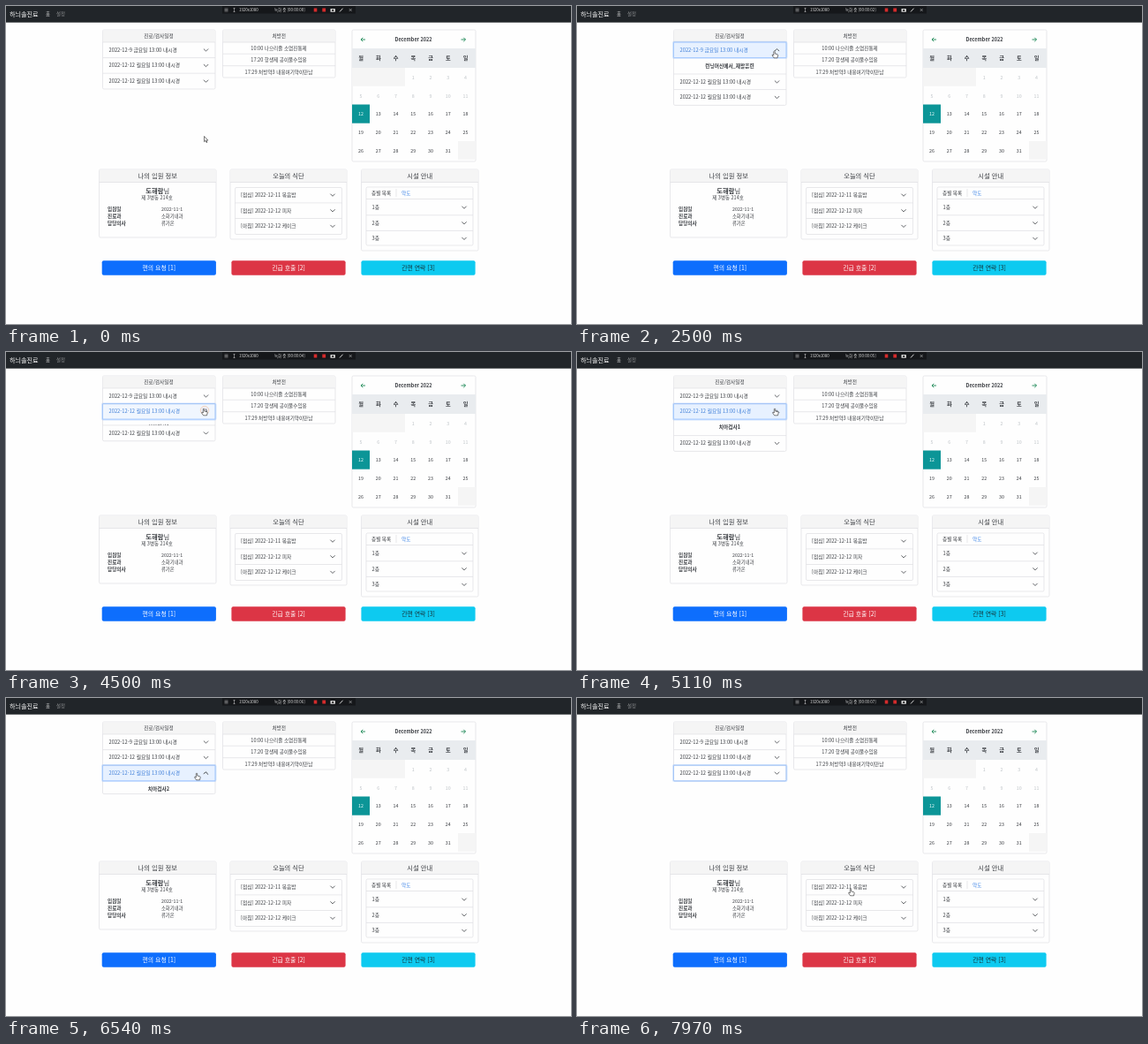
Write an HTML page that moves like this. It is 640 px wide and 360 px high and loops after 8000 ms.

```html
<!DOCTYPE html>
<html lang="ko">
<head>
<meta charset="utf-8">
<style>
  html, body { margin: 0; width: 100%; height: 100%; overflow: hidden; background: #fefefe; }
  svg { display: block; width: 100%; height: 100%; }
  text { font-family: "Noto Sans CJK KR", "Noto Sans CJK", "Noto Sans", sans-serif; white-space: pre; }
</style>
</head>
<body>
<svg id="stage" viewBox="0 0 640 360"></svg>
<script>
const LOOP = 8000;
const INK = '#3a3d42', LINE = '#dedee2', TINT = '#f5f5f5', PAPER = '#fefefe';
const stage = document.getElementById('stage');

// Static markup helpers
const rect = (x, y, w, h, fill, extra = '') =>
  `<rect x="${x}" y="${y}" width="${w}" height="${h}" fill="${fill}" ${extra}/>`;
const frame = (x, y, w, h, r = 1.5) => rect(x, y, w, h, PAPER, `rx="${r}" stroke="${LINE}" stroke-width=".7"`);
const path = (d, color, width = 0.8, extra = '') =>
  `<path d="${d}" fill="none" stroke="${color}" stroke-width="${width}" ${extra}/>`;
const rule = (x1, x2, y) => path(`M${x1} ${y}H${x2}`, LINE, 0.7);
function label(str, x, y, size = 5.7, { anchor = 'start', color = INK, weight = 400, id = '' } = {}) {
  return `<text ${id && `id="${id}"`} x="${x}" y="${y + size * 0.36}" font-size="${size}" fill="${color}"
    font-weight="${weight}" text-anchor="${anchor}">${str}</text>`;
}
const centered = (str, x, y, size, options = {}) => label(str, x, y, size, { ...options, anchor: 'middle' });
const chevron = (x, y) => path(`M${x - 2.6} ${y - 1.3}l2.6 2.6 2.6 -2.6`, INK, 0.8);

function card(title, x, y, w, h, head, size) {
  return frame(x, y, w, h) + rect(x + 0.3, y + 0.3, w - 0.6, head, TINT) +
    rule(x, x + w, y + head) + centered(title, x + w / 2, y + head / 2, size);
}

function navbar() {
  const grey = '#909294', pale = '#d8d8d8';
  return rect(0, 0, 640, 18.67, '#212529') +
    label('하늬솔진료', 4, 9, 7.1, { color: '#fff' }) +
    label('홈', 45, 9, 5.4, { color: pale }) + label('설정', 57, 9, 5.4, { color: grey }) +
    rect(245, 0, 151, 8.5, '#15171a') +
    path('M247.5 3h4M247.5 4.5h4M247.5 6h4M258.5 2v5M257.5 3l1 -1 1 1M257.5 6l1 1 1 -1', pale, 0.5) +
    label('1920x1080', 264, 4.4, 4.4, { color: pale }) +
    label('', 304, 4.4, 4.4, { color: pale, id: 'timer' }) +
    rect(348.7, 2.5, 3.6, 4, '#d52b2c') + rect(358.3, 2.5, 3.8, 4, '#d52b2c') +
    rect(367.5, 3, 5.4, 3.8, pale, 'rx=".6"') + '<circle cx="370.2" cy="4.9" r="1.1" fill="#222"/>' +
    path('M378 6.5l3.5 -3.8', pale, 1) + path('M388.7 3l3 3M391.7 3l-3 3', pale, 0.5);
}

function prescriptions() {
  const rows = ['10:00 나으리졸 소염진통제', '17:20 항생제 공이풀수입용', '17:29 처방약3 내용여기약이만남'];
  return card('처방전', 245.5, 27, 127.5, 54, 14, 5.7) +
    rows.map((row, i) => centered(row, 309, 47.5 + i * 13.5, 5.6) +
      (i ? rule(245.5, 373, 40.7 + i * 13.5) : '')).join('');
}

function calendar() {
  const left = 392, cell = 20, top = 70, rowH = 20.75;
  const column = i => left + 10 + i * 19.75;
  let out = frame(left, 27, 140, 149) + rect(left, 48, 140, 22, '#e9ecef') +
    rect(left, top, 60, rowH, TINT) + rect(512, top + rowH * 4, 20, rowH, TINT) +
    centered('December 2022', 461.5, 38, 5.5, { weight: 700 }) +
    path('M407 38h-5M404.2 35.8l-2.2 2.2 2.2 2.2M515.5 38h5M518.3 35.8l2.2 2.2 -2.2 2.2', '#198754', 0.9);
  [...'월화수목금토일'].forEach((day, i) => out += centered(day, column(i), 59, 6.2, { weight: 700 }));
  out += rect(left, 111.5, cell, 21.2, '#0c9597');
  for (let day = 1; day <= 31; day++) {
    const slot = day + 2;
    const color = day < 12 ? '#bfc4c8' : day === 12 ? '#f0ffff' : INK;
    out += centered(day, column(slot % 7), 81 + Math.floor(slot / 7) * rowH, 5.3, { color });
  }
  return out;
}

function patientInfo() {
  const rows = [['입원일', '2022-11-1'], ['진료과', '소화기내과'], ['담당의사', '류가온']];
  return card('나의 입원 정보', 105.5, 185, 132.5, 77, 14.5, 7.3) +
    centered('<tspan font-weight="700">도해람</tspan>님', 171.7, 209, 7.3) +
    centered('제 3병동 214호', 171, 217.5, 5.5) +
    rows.map(([key, value], i) => label(key, 115, 230 + i * 8, 5.6, { weight: 700 }) +
      label(value, 176, 230 + i * 8, 5.3)).join('');
}

function meals() {
  const rows = ['[점심] 2022-12-11 볶음밥', '[점심] 2022-12-12 피자', '[아침] 2022-12-12 케이크'];
  return card('오늘의 식단', 254, 185, 132, 79, 14.5, 7.3) + frame(259.5, 205.5, 121, 53) +
    rows.map((row, i) => label(row, 266, 214 + i * 17.6) + chevron(370, 214 + i * 17.6) +
      (i ? rule(259.5, 380.5, 205.3 + i * 17.6) : '')).join('');
}

function facilities() {
  return card('시설 안내', 402.5, 185, 132.5, 92, 14.5, 7.3) + frame(408, 205, 121, 66) +
    rule(408, 529, 218.5) + path('M442 207v9', LINE, 0.7) +
    label('층별 목록', 414, 211.5, 5.6) + label('약도', 448, 211.5, 5.6, { color: '#3f86e8' }) +
    [1, 2, 3].map((n, i) => label(n + '층', 414.5, 228 + i * 17.6) + chevron(519, 228 + i * 17.6) +
      (i ? rule(408, 529, 219.2 + i * 17.6) : '')).join('');
}

const button = (str, x, fill, color) => rect(x, 288.2, 129.2, 16.5, fill, 'rx="2"') +
  centered(str, x + 64.6, 296.5, 6.9, { color });

// Schedule accordion: press = mouse down, toggles start a little later
const ROW = 17.6, BODY = 18.4, LIST_TOP = 41;
const items = [
  { title: '2022-12-9 금요일 13:00 내시경', body: '런닝머신에서_재활훈련', press: 2000, open: 2140, close: 3400 },
  { title: '2022-12-12 월요일 13:00 내시경', body: '치아검사1', press: 4240, open: 4420, close: 5610 },
  { title: '2022-12-12 월요일 13:00 내시경', body: '치아검사2', press: 6140, open: 6370, close: 7400 },
];
const clicks = [[2000, 224, 51], [3270, 224, 51], [4240, 225, 66], [5470, 224, 66], [6140, 217, 86], [7270, 217, 86]];
const ticks = [1070, 2140, 3270, 4240, 5110, 6140, 7270];
const moves = [
  { from: 1330, to: 2000, x: 223.5, y: 51 },
  { from: 3540, to: 3840, x: 224, y: 64 },
  { from: 5540, to: 5900, x: 216, y: 85 },
  { from: 7460, to: 7960, x: 310, y: 216 },
];

const clamp = v => Math.max(0, Math.min(1, v));
const smooth = v => v * v * (3 - 2 * v);
const mix = (a, b, k) => a + (b - a) * k;

// CSS "ease": cubic-bezier(.25, .1, .25, 1)
function ease(x) {
  const curve = (a, b, u) => 3 * a * u * (1 - u) ** 2 + 3 * b * u * u * (1 - u) + u ** 3;
  let low = 0, high = 1;
  for (let i = 0; i < 18; i++) {
    const mid = (low + high) / 2;
    if (curve(0.25, 0.25, mid) < x) low = mid; else high = mid;
  }
  return curve(0.1, 1, low);
}
const progress = (t, start, length) => clamp((t - start) / length);
const toggled = (t, item, length, curve) =>
  curve(progress(t, item.open, length)) - curve(progress(t, item.close, length));

function scheduleItem(item, i) {
  return `<g id="item${i}">
    <clipPath id="clip${i}"><rect id="window${i}" x="109" y="${ROW}" width="129" height="0"/></clipPath>
    <g clip-path="url(#clip${i})">${centered(item.body, 173, ROW + 9, 5.7, { weight: 700 })}</g>
    ${rect(109.5, 0, 127.5, ROW, '#e7f1ff', `id="tint${i}" opacity="0"`)}
    ${i ? rule(109.5, 237, 0) : ''}
    ${label(item.title, 116.5, 8.8, 5.75, { id: 'title' + i })}
    <g id="chevron${i}">${chevron(0, 0)}</g></g>`;
}

stage.innerHTML = rect(0, 0, 640, 360, PAPER) + navbar() +
  rect(109.5, 27, 127.5, 67, PAPER, `id="schedule" rx="1.5" stroke="${LINE}" stroke-width=".7"`) +
  rect(109.8, 27.3, 126.9, 13.7, TINT) + rule(109.5, 237, 41) + centered('진료/검사일정', 173, 33.7, 5.7) +
  items.map(scheduleItem).join('') +
  `<g id="focus">${rect(109, -0.3, 128.5, ROW + 0.6, 'none', 'rx="1" stroke="#0d6efd" stroke-opacity=".18" stroke-width="1.8"')}
    ${rect(109.5, 0, 127.5, ROW, 'none', 'rx="1" stroke="#86b7fe" stroke-width=".5"')}</g>` +
  prescriptions() + calendar() + patientInfo() + meals() + facilities() +
  button('편의 요청 [1]', 108.7, '#0d6efd', '#fff') +
  button('긴급 호출 [2]', 255.4, '#dc3545', '#fff') +
  button('간편 연락 [3]', 402.4, '#0dcaf0', '#16333a') +
  `<circle id="ripple"/>
  <g id="cursor" stroke="#222" stroke-width=".6" stroke-linejoin="round" fill="#fff">
    <path id="arrow" d="M0 0V6.2L1.5 4.9 2.5 7.1 3.4 6.7 2.4 4.6H4.3Z"/>
    <path id="hand" d="M-.7 .5Q0 -.5 .7 .5V3L3.6 3.7Q4.3 4 4.1 5L3.5 7.8H-.4L-2.4 4.9Q-2.4 3.9 -1.5 4.2L-.7 5Z"/>
  </g>`;

const get = id => document.getElementById(id);
function set(id, attributes) {
  for (const [name, value] of Object.entries(attributes)) get(id).setAttribute(name, value);
}

function drawSchedule(t) {
  const focused = items.findLastIndex(item => t >= item.press);
  let y = LIST_TOP;
  set('focus', { visibility: focused < 0 ? 'hidden' : 'visible' });
  items.forEach((item, i) => {
    const height = BODY * toggled(t, item, 350, ease);
    const tint = toggled(t, item, 150, smooth);
    const turn = 180 * toggled(t, item, 200, smooth);
    set('item' + i, { transform: `translate(0 ${y})` });
    set('window' + i, { height });
    set('tint' + i, { opacity: tint });
    set('title' + i, { fill: tint > 0.5 ? '#3f7fd8' : INK });
    set('chevron' + i, { transform: `translate(226.5 8.8) rotate(${-turn})` });
    if (i === focused) set('focus', { transform: `translate(0 ${y})` });
    y += ROW + height;
  });
  set('schedule', { height: y - 26.8 });
  return y;
}

function drawPointer(t, listBottom) {
  let x = 224.5, y = 147.5;
  for (const move of moves) {
    const k = smooth(progress(t, move.from, move.to - move.from));
    x = mix(x, move.x, k);
    y = mix(y, move.y, k);
  }
  const overSchedule = x > 109 && x < 237 && y > LIST_TOP && y < listBottom;
  const overMeals = x > 259 && x < 381 && y > 205 && y < 258;
  const hand = overSchedule || overMeals;
  set('cursor', { transform: `translate(${x} ${y})` });
  set('hand', { visibility: hand ? 'visible' : 'hidden' });
  set('arrow', { visibility: hand ? 'hidden' : 'visible' });

  const click = clicks.findLast(([time]) => t >= time);
  const age = click ? (t - click[0]) / 400 : 1;
  if (age >= 1) return set('ripple', { visibility: 'hidden' });
  set('ripple', {
    visibility: 'visible', cx: click[1], cy: click[2], r: mix(2.4, 6, age),
    fill: '#f0562c', 'fill-opacity': 0.85 * (1 - age) ** 3,
    stroke: '#f08a3c', 'stroke-width': 0.9, 'stroke-opacity': 1 - age,
  });
}

function draw(now) {
  const t = now % LOOP;
  get('timer').textContent = `녹화 중 [00:00:0${ticks.filter(tick => t >= tick).length}]`;
  drawPointer(t, drawSchedule(t));
}

const start = performance.now();
function tick() {
  draw(performance.now() - start);
  requestAnimationFrame(tick);
}
tick();
</script>
</body>
</html>
```
